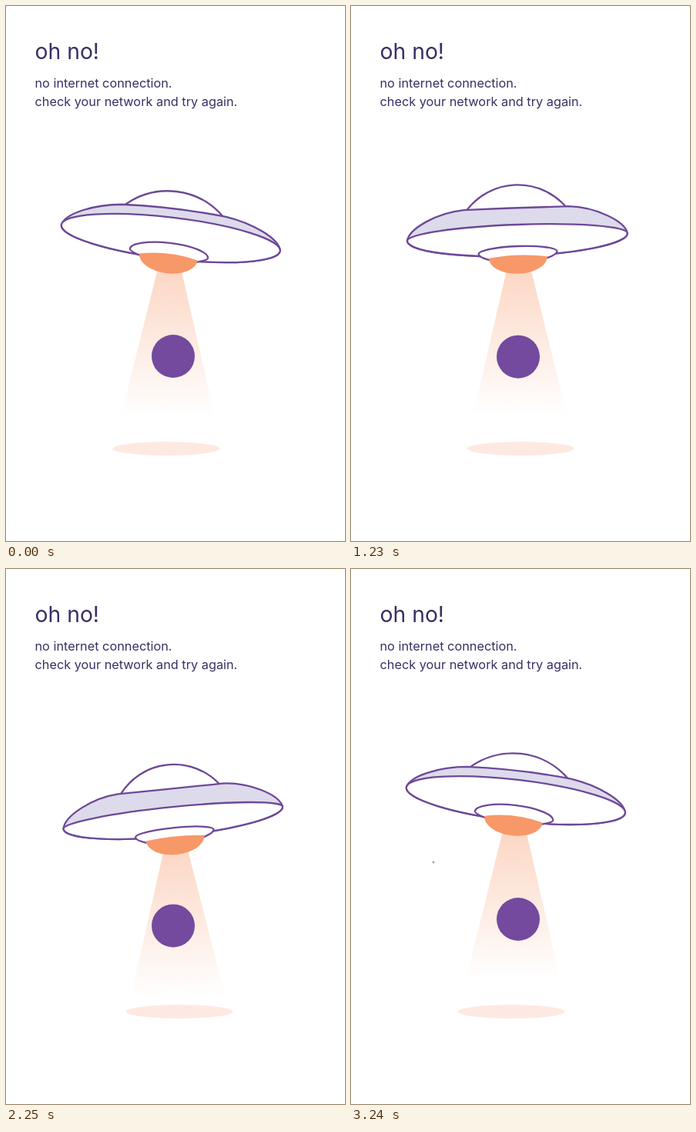
These frames come from a looping animation (440x695 px, 3270 ms). An HTML page:

```html
<!DOCTYPE html>
<html lang="en">
<head>
<meta charset="utf-8">
<title>No connection</title>
<style>
  html, body { margin: 0; width: 100%; height: 100%; overflow: hidden; background: #fff; }
  svg { display: block; width: 440px; height: 695px; }
  text { font-family: Inter, Roboto, sans-serif; font-optical-sizing: none; fill: #3b2e63; }
  .line { stroke: #6d4897; stroke-width: 2.3; stroke-linejoin: round; stroke-linecap: round; }
  .star { stroke: #3b2e63; stroke-width: 1.7; fill: none; }
</style>
</head>
<body>
<svg viewBox="0 0 440 695">
  <defs>
    <linearGradient id="glow" x1="0" y1="0" x2="0" y2="1">
      <stop offset="0" stop-color="#f79868" stop-opacity=".4"/>
      <stop offset="1" stop-color="#f79868" stop-opacity="0"/>
    </linearGradient>
  </defs>

  <text x="37.5" y="69" font-size="28.3">oh no!</text>
  <text x="37.5" y="106" font-size="16.3">no internet connection.</text>
  <text x="37.5" y="130" font-size="16.3">check your network and try again.</text>

  <ellipse id="shadow" cy="575" rx="69.5" ry="9" fill="#fee9e2"/>
  <path id="beam" fill="url(#glow)"/>
  <circle id="cargo" cx="217" r="28" fill="#734a9e"/>

  <g id="ship">
    <path id="dome" class="line" fill="#fff"/>
    <path id="hull" class="line" fill="#dddaeb"/>
    <path id="rim" class="line" fill="#fff"/>
    <path id="collar" class="line" fill="#fff"/>
    <path id="lamp" fill="#f79868"/>
  </g>

  <path id="starA" class="star" d="M-5.4 0H5.4M0-5.4V5.4"/>
  <path id="starB" class="star" d="M-5.4 0H5.4M0-5.4V5.4"/>
  <path id="starC" class="star" d="M-5.4 0H5.4M0-5.4V5.4"/>
</svg>
<script>
const LOOP = 3270;
const { sin, cos, PI, abs, max } = Math;
const set = (id, name, value) => document.getElementById(id).setAttribute(name, value);

function drawShip(x, y, angle, pitch) {
  const shoulder = 40.2 - .17 * pitch;
  const domeRise = 38.3 - .5 * pitch;
  const domeR = (64 ** 2 + domeRise ** 2) / (2 * domeRise);
  const crown = shoulder + .44 * (pitch - 15);
  const flank = shoulder - .2 * (pitch - 5);
  const belly = 20.5 + .25 * pitch;
  const lampY = 28.7 - .14 * pitch;
  const cuff = 20.5;

  set("ship", "transform", `translate(${x} ${y}) rotate(${angle})`);
  set("dome", "d", `M-64 ${-shoulder}A${domeR} ${domeR} 0 0 1 64 ${-shoulder}`);
  set("hull", "d", `M-143 0C-140 -16 -103 ${-flank} -68 ${-shoulder}Q0 ${-crown} 68 ${-shoulder}`
    + `C103 ${-flank} 140 -16 143 0A143 ${belly} 0 0 1 -143 0Z`);
  set("rim", "d", `M-143 0A143 ${pitch} 0 0 1 143 0A143 ${belly} 0 0 1 -143 0Z`);
  set("collar", "d", `M-38 ${lampY + 2}Q-51 ${lampY - 2} -51 ${cuff}`
    + `A51 ${.5 * pitch + .5} 0 0 1 51 ${cuff}Q51 ${lampY - 2} 38 ${lampY + 2}`);
  set("lamp", "d", `M-38 ${lampY}Q0 ${lampY - .34 * pitch} 38 ${lampY}A38 21.3 0 0 1 -38 ${lampY}Z`);
}

function drawBeam(y, angle) {
  const top = 216.5 - .65 * angle, foot = 217.3 - 1.05 * angle;
  set("beam", "d", `M${top - 14.6} ${y + 38}H${top + 14.6}L${foot + 61} ${y + 232}H${foot - 61}Z`);
}

// Grows and turns, then shrinks back.
function drawStar(id, x, y, p) {
  const size = p > 0 && p < 1 ? sin(PI * p) : 0;
  set(id, "transform", `translate(${x} ${y}) rotate(${40 * size * size}) scale(${size})`);
  set(id, "visibility", size > .26 ? "visible" : "hidden");
}

function frame(now) {
  const t = now % LOOP;
  const a = 2 * PI * t / LOOP;
  const sway = 6.4 * cos(a) + 3.1 * sin(a) + .4 * cos(2 * a) - .35 * sin(2 * a);
  const y = 310.2 + 2.5 * cos(a) - 1.5 * sin(a)
    - 10.5 * cos(2 * a) + 7.5 * sin(2 * a) - cos(3 * a) + 1.5 * sin(3 * a);
  const pitch = 18 - 1.5 * sin(a) + 8.6 * cos(2 * a) + sin(2 * a);

  drawShip(215.4 - .23 * sway, y, sway, pitch);
  drawBeam(y, sway);
  set("shadow", "cx", 217.2 - 1.37 * sway);

  const dip = max(0, 1 - abs(t - 450) / 120);
  set("cargo", "cy", 458.5 + cos(a) - 1.5 * sin(a) - 4.5 * cos(2 * a) + sin(2 * a));
  set("cargo", "opacity", 1 - .5 * dip);

  drawStar("starA", 350.5, 369.5, (t - 150) / 610);
  drawStar("starB", 114, 230, (t - 1320) / 700);
  drawStar("starC", 107, 381, (t - 2500) / 820);
}

const start = performance.now();
function tick() {
  frame(performance.now() - start);
  requestAnimationFrame(tick);
}
tick();
</script>
</body>
</html>
```
